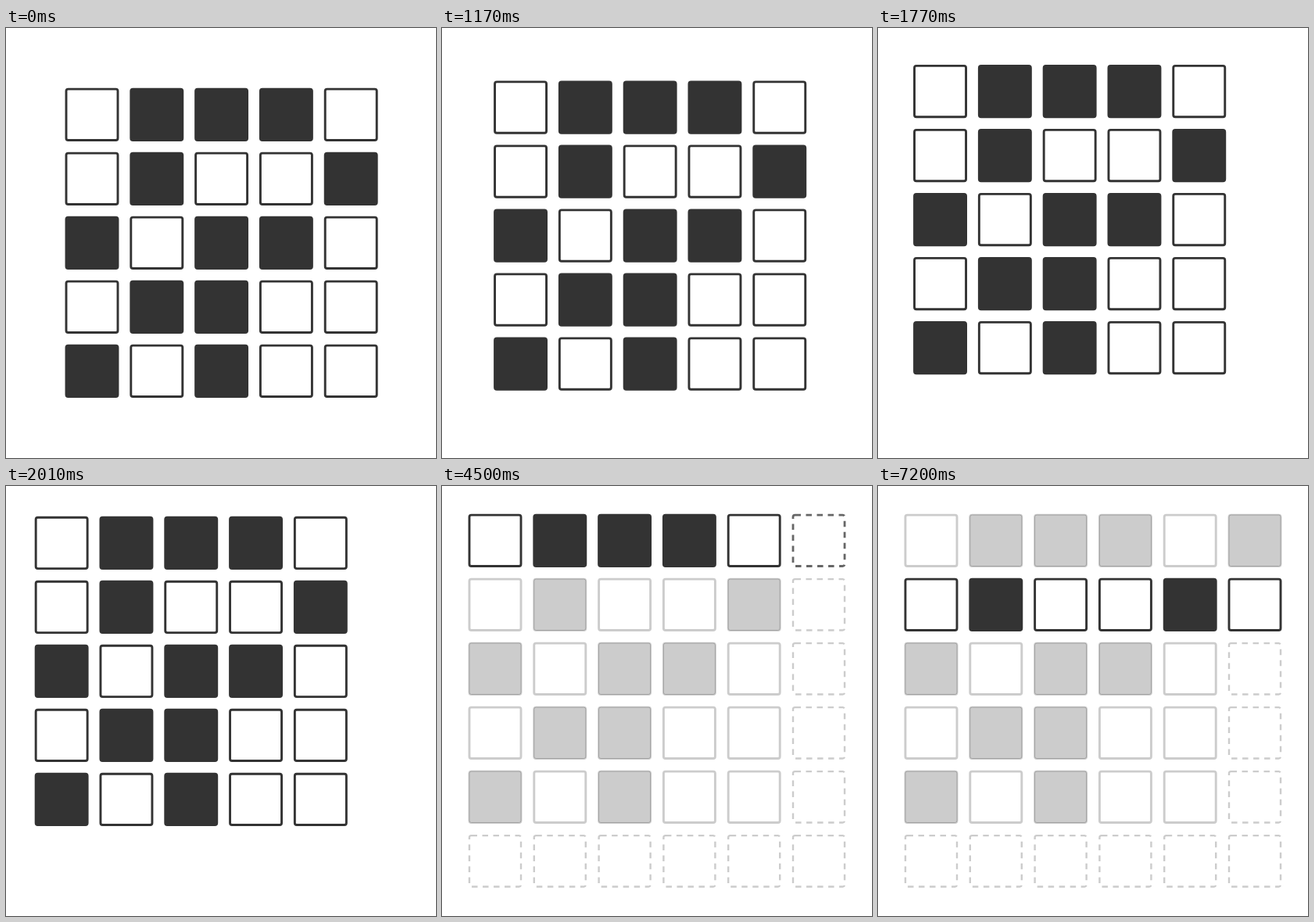
These frames come from a looping animation (550 by 550 pixels, 8 s). An HTML page with a canvas:

```html
<!DOCTYPE html>
<html lang="en">
<head>
<meta charset="utf-8">
<title>Parity grid</title>
<style>
  html, body { margin: 0; width: 100%; height: 100%; overflow: hidden; background: #fff; }
  canvas { display: block; width: 100vw; height: 100vh; }
</style>
</head>
<body>
<canvas></canvas>
<script>
const SIZE = 550, LOOP = 8000;
const DARK = '#333', DASH = '#666', PALE = '#ccc', RIM = '#999';
const BITS = ['01110', '01001', '10110', '01100', '10100'];
const PARITY = '10';
const LEFT = 35, TOP = 37.1, STEP_X = 82.8, STEP_Y = 82, W = 66, H = 65.4;

// start time, parity cells shown, highlighted row (-1 = all), parity bits solved
const STAGES = [
  [0, false, -1, 0],
  [2700, true, -1, 0],
  [4500, true, 0, 0],
  [5400, true, 0, 1],
  [6300, true, 1, 1],
  [7200, true, 1, 2],
];

const canvas = document.querySelector('canvas');
const ctx = canvas.getContext('2d');

function resize() {
  const ratio = devicePixelRatio || 1;
  canvas.width = innerWidth * ratio;
  canvas.height = innerHeight * ratio;
}

function box(x, y) {
  ctx.beginPath();
  ctx.roundRect(x, y, W, H, 2.5);
}

function solidCell(x, y, filled, lit) {
  ctx.strokeStyle = ctx.fillStyle = lit ? DARK : PALE;
  ctx.lineWidth = 2.9;
  ctx.setLineDash([]);
  box(x, y);
  if (filled) ctx.fill();
  ctx.stroke();
  if (filled && !lit) {
    ctx.strokeStyle = RIM;
    ctx.lineWidth = 0.8;
    box(x, y);
    ctx.stroke();
  }
}

function dashedCell(x, y, lit) {
  ctx.strokeStyle = lit ? DASH : PALE;
  ctx.lineWidth = lit ? 2.8 : 2.4;
  ctx.setLineDash([7.5, 6.5]);
  box(x, y);
  ctx.stroke();
}

function draw(t) {
  const [, parity, row, solved] = STAGES.findLast(s => s[0] <= t);
  // the grid glides in 40 even steps of 30 ms
  const step = Math.max(0, Math.min(40, Math.floor((t - 930) / 30) + 1));
  const rest = 1 - step / 40;

  ctx.setTransform(canvas.width / SIZE, 0, 0, canvas.height / SIZE, 0, 0);
  ctx.fillStyle = '#fff';
  ctx.fillRect(0, 0, SIZE, SIZE);

  const count = parity ? 6 : 5;
  for (let r = 0; r < count; r++) {
    const lit = row < 0 || row === r;
    for (let c = 0; c < count; c++) {
      const x = LEFT + c * STEP_X + 42 * rest;
      const y = TOP + r * STEP_Y + 41 * rest;
      const bit = r < 5 && c < 5 ? BITS[r][c] : c === 5 && r < solved ? PARITY[r] : null;
      if (bit === null) dashedCell(x, y, lit);
      else solidCell(x, y, bit === '1', lit);
    }
  }
}

const start = performance.now();
function tick() {
  draw((performance.now() - start) % LOOP);
  requestAnimationFrame(tick);
}
addEventListener('resize', resize);
resize();
tick();
</script>
</body>
</html>
```
